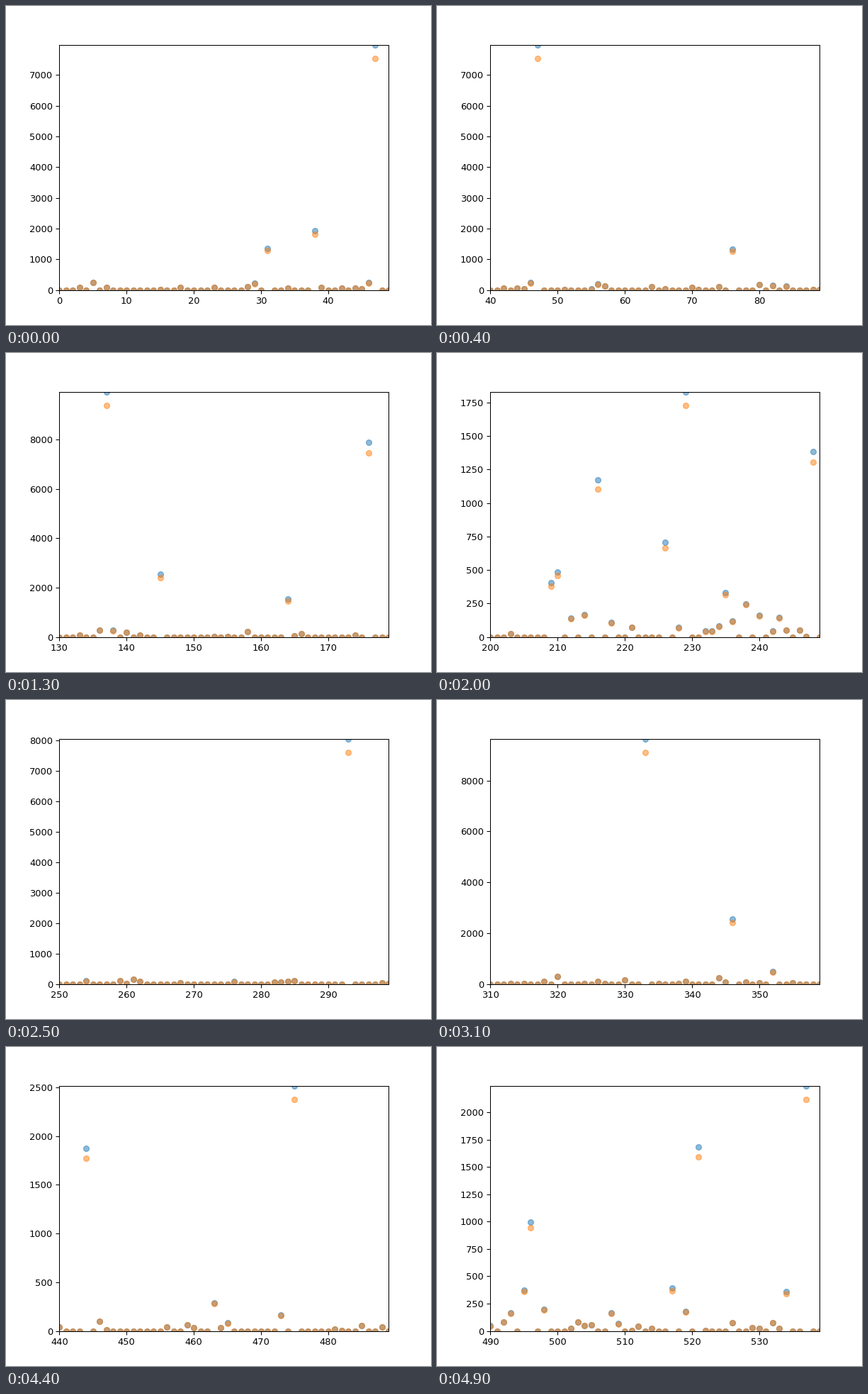
A matplotlib script that plays this animation: 600x450 px, repeating every 5000 ms.

```python
import numpy as np
import matplotlib.pyplot as plt
from matplotlib.animation import FuncAnimation

FRAMES, STEP, WINDOW = 50, 10, 50
COUNT = (FRAMES - 1) * STEP + WINDOW
WIDTH, HEIGHT, DPI = 600, 450, 93.75

# The few strong outliers: position and value
PEAKS = {
    31: 1360, 38: 1925, 47: 7992, 76: 1320, 137: 9946, 145: 2530, 164: 1535,
    176: 7880, 209: 403, 210: 486, 216: 1170, 226: 704, 229: 1831, 235: 333,
    248: 1383, 293: 8060, 333: 9652, 346: 2560, 352: 501, 426: 1288,
    431: 2144, 444: 1873, 475: 2518, 496: 998, 517: 390, 521: 1685,
    534: 358, 537: 2243,
}


def build_series():
    """Mostly zeros, sparse low activity, and the outliers on top."""
    rng = np.random.default_rng(4)
    active = rng.random(COUNT) < 0.38
    actual = active * np.minimum(rng.exponential(90, COUNT), 370)
    predicted = actual * 0.97
    for place, value in PEAKS.items():
        actual[place], predicted[place] = value, value * 0.945
    return actual, predicted


actual, predicted = build_series()

fig, ax = plt.subplots(figsize=(WIDTH / DPI, HEIGHT / DPI), dpi=DPI)
fig.subplots_adjust(left=75.3 / WIDTH, right=540.3 / WIDTH,
                    bottom=49.5 / HEIGHT, top=395.5 / HEIGHT)
for series in (actual, predicted):
    ax.scatter(np.arange(COUNT), series, alpha=0.5)


def update(frame):
    start = frame * STEP
    ax.set_xlim(start, start + WINDOW - 1)
    ax.set_ylim(0, actual[start:start + WINDOW].max())
    return ax.collections


anim = FuncAnimation(fig, update, frames=FRAMES, interval=100,
                     repeat=True, repeat_delay=0, blit=False)
plt.show()
```
